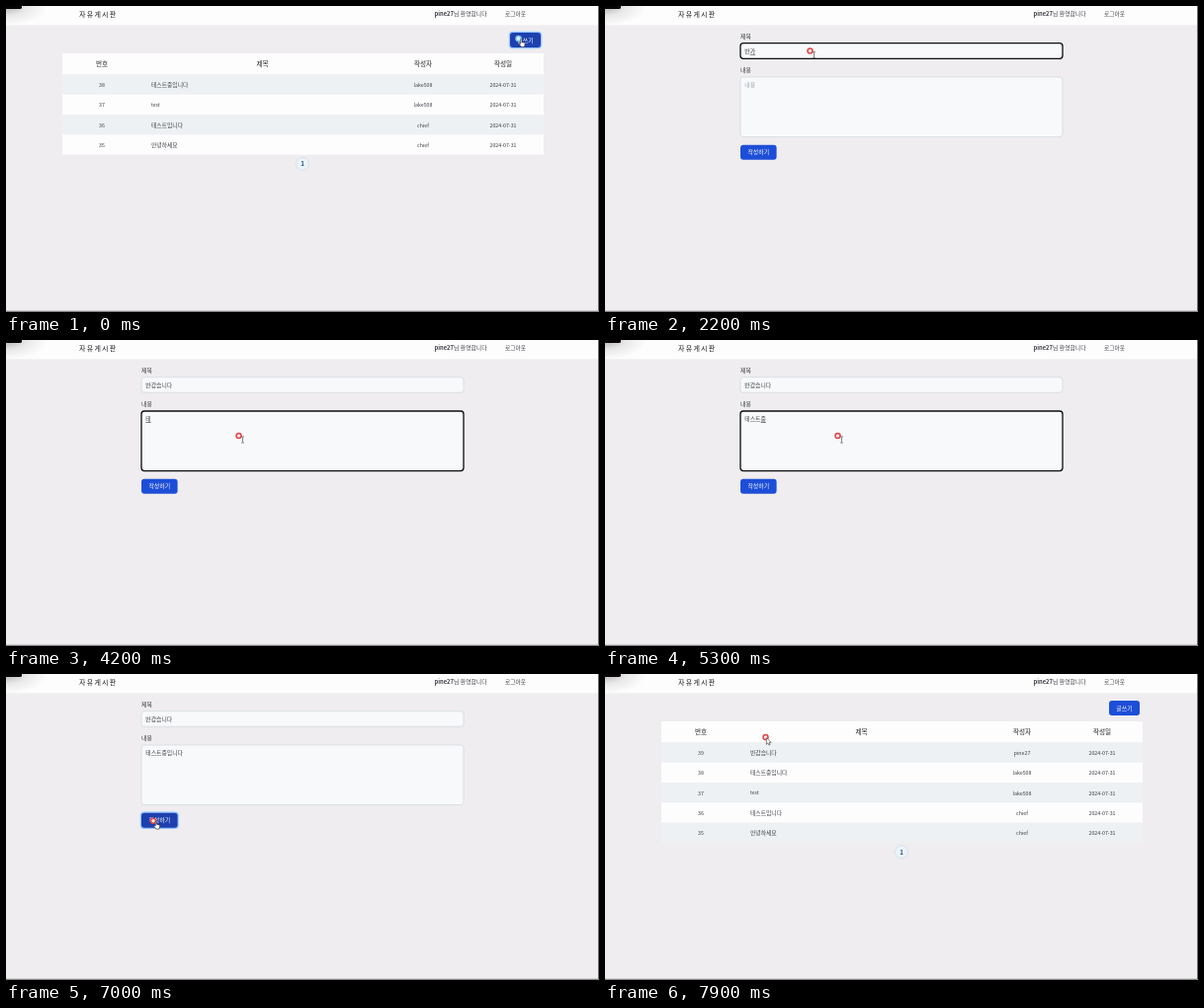
An HTML page that plays this animation: 600x310 px, repeating every 8000 ms.

```html
<!DOCTYPE html>
<html lang="ko">
<head>
<meta charset="utf-8">
<style>
  html, body { margin: 0; height: 100%; overflow: hidden; background: #efedef; }
  svg { display: block; width: 100vw; height: 100vh; }
  text { font-family: "Noto Sans CJK KR", "Noto Sans CJK", "Noto Sans", sans-serif; white-space: pre; }
</style>
</head>
<body>
<svg id="stage" viewBox="0 0 600 310">
  <defs>
    <radialGradient id="shade" cx="0" cy="0" r="1">
      <stop offset="0" stop-color="#000" stop-opacity=".3"/>
      <stop offset=".5" stop-color="#000" stop-opacity=".08"/>
      <stop offset="1" stop-color="#000" stop-opacity="0"/>
    </radialGradient>
  </defs>
  <rect width="600" height="310" fill="#efedef"/>
  <rect width="600" height="19.3" fill="#fdfdfe"/>
  <g id="header"></g>
  <g id="page"></g>
  <rect width="42" height="20" fill="url(#shade)"/>
  <path d="M0 0H16V1.5Q16 3 14 3H0Z" fill="#080408"/>
  <path d="M599.5 0V309.3H0" fill="none" stroke="#626064" stroke-width=".9"/>
  <g id="pointer"></g>
</svg>
<script>
const LOOP = 8000;
const FORM_OPENS = 300, TITLE_FOCUS = 600, BODY_FOCUS = 3400, SUBMIT = 6900, LIST_OPENS = 7200;
const GLYPH = 5.4, DARK = '#3c3e44';

// [time, x, y] of the input-mode ring that travels with the mouse
const PATH = [
  [0, 518.5, 33], [200, 518.5, 33], [600, 207.5, 45.5], [3100, 207.5, 45.5],
  [3400, 235.5, 97], [6150, 235.5, 97], [6400, 125, 138], [6650, 135, 158],
  [6850, 149, 148], [7100, 149, 149], [7250, 154, 157], [7600, 165.5, 128], [7900, 162.5, 64]
];
// [time, text] while syllables are being composed
const TITLE = [
  [1800, 'ㅂ'], [1900, '바'], [2000, '반'], [2100, '반ㄱ'], [2200, '반가'], [2400, '반갑'],
  [2500, '반갑스'], [2600, '반갑습'], [2700, '반갑습니'], [2800, '반갑습니다']
];
const BODY = [
  [4000, 'ㅌ'], [4100, '테'], [4300, '텟'], [4800, '테스'], [5000, '테스트'], [5200, '테스트주'],
  [5300, '테스트중'], [5500, '테스트중이'], [5600, '테스트중입'], [5800, '테스트중입니'], [6000, '테스트중입니다']
];
const POSTS = [
  [39, '반갑습니다', 'pine27'], [38, '테스트중입니다', 'lake508'], [37, 'test', 'lake508'],
  [36, '테스트입니다', 'chief'], [35, '안녕하세요', 'chief']
];

const $ = id => document.getElementById(id);

function text(value, x, y, { size = 5.85, fill = DARK, weight = 400, anchor = 'start', spacing = 0 } = {}) {
  return `<text x="${x}" y="${y + size * .37}" font-size="${size}" fill="${fill}" font-weight="${weight}"
    text-anchor="${anchor}" letter-spacing="${spacing}">${value}</text>`;
}
function box(x, y, w, h, fill, extra = '') {
  return `<rect x="${x}" y="${y}" width="${w}" height="${h}" fill="${fill}" ${extra}/>`;
}
const cell = (value, x, y) => text(value, x, y, { size: 5.25, anchor: 'middle' });

function button(label, x, y, w, active) {
  const ring = active ? box(x - 1.2, y - 1.2, w + 2.4, 17.4, '#93c5fd', 'rx="4"') : '';
  return ring + box(x, y, w, 15, active ? '#1e40af' : '#1d4ed8', 'rx="3"') +
    text(label, x + w / 2, y + 7.5, { size: 5.9, fill: '#fff', weight: 500, anchor: 'middle' });
}

function listPage(posts, pressed, hovered) {
  const rowHeight = 20.35;
  let out = button('글쓰기', 510, 27, 31, pressed) + box(57, 48, 487, 21.3, '#fdfdfe');
  [['번호', 97], ['제목', 259.5], ['작성자', 422], ['작성일', 503]].forEach(([label, x]) =>
    out += text(label, x, 58.7, { size: 6.6, weight: 500, fill: '#222', anchor: 'middle' }));
  posts.forEach(([id, title, author], i) => {
    const top = 69.3 + i * rowHeight, y = top + 10.6;
    const fill = id === hovered ? '#dee0e1' : i % 2 ? '#fdfdfe' : '#eef1f3';
    out += box(57, top, 487, rowHeight, fill) + cell(id, 97, y) +
      text(title, 147, y, { size: title === 'test' ? 5 : 5.8 }) +
      cell(author, 422, y) + cell('2024-07-31', 503, y);
  });
  const y = 78.5 + posts.length * rowHeight;
  return out + `<circle cx="300" cy="${y}" r="6.5" fill="#ecf3f9" stroke="#cddfee" stroke-width=".8"/>` +
    text('1', 300, y, { size: 6.2, weight: 700, fill: '#234a82', anchor: 'middle' });
}

function latest(steps, t) {
  return steps.reduce((value, [at, next]) => t >= at ? next : value, '');
}

function field(label, value, y, h, focusedFor) {
  const focused = focusedFor >= 0, x = 141.3, lineY = y + 8;
  const border = focused ? 'stroke="#0c0d10" stroke-width="1.3"' : 'stroke="#d3dae1" stroke-width=".8"';
  const end = x + value.length * GLYPH;
  let out = text(label, 137, y - 7.2, { fill: '#33363c' }) +
    box(137, y, 326, h, '#f7f9fb', `rx="3" ${border}`) +
    text(value || label, x, lineY, { fill: value ? DARK : '#a0a5ae' });
  if (focused && value) out += box(end - GLYPH, lineY + 3.2, GLYPH, .6, '#333');
  if (focused && focusedFor % 1060 < 530) out += box(end - .2, lineY - 3.7, .6, 7.2, '#222');
  return out;
}

function formPage(t) {
  const titleFocus = t < BODY_FOCUS ? t - TITLE_FOCUS : -1;
  const bodyFocus = t < SUBMIT ? t - BODY_FOCUS : -1;
  return field('제목', latest(TITLE, t), 37.7, 15.6, titleFocus) +
    field('내용', latest(BODY, t), 72, 60.6, bodyFocus) +
    button('작성하기', 137, 140.8, 36.6, t >= SUBMIT);
}

function position(t) {
  const i = PATH.findIndex(([at]) => at > t);
  if (i < 0) return PATH[PATH.length - 1].slice(1);
  const [t0, x0, y0] = PATH[i - 1], [t1, x1, y1] = PATH[i];
  const k = (t - t0) / (t1 - t0), ease = k * k * (3 - 2 * k);
  return [x0 + (x1 - x0) * ease, y0 + (y1 - y0) * ease];
}

const CURSORS = {
  arrow: '<path d="M.8 .5V7.3L2.4 5.9L3.4 8L4.6 7.5L3.6 5.4H5.6Z" fill="#fff" stroke="#333" stroke-width=".6"/>',
  hand: '<path d="M2.3 .8Q3.2 .2 3.5 1.2V3.7L6 4.3Q6.8 4.6 6.6 5.6L6 8.4H2.8L.8 5.7Q.9 4.7 2.3 5.2Z" fill="#fff" stroke="#333" stroke-width=".65"/>',
  beam: '<path d="M2.6 .8H3.6L4 1.2L4.4 .8H5.4M4 1.2V6.8M2.6 7.2H3.6L4 6.8L4.4 7.2H5.4" fill="none" stroke="#444" stroke-width=".65"/>'
};

function cursorKind(t, x, y) {
  if (t < FORM_OPENS) return t < 250 ? 'hand' : 'arrow';
  if (t >= LIST_OPENS) return y > 66 ? 'hand' : 'arrow';
  const inside = (left, right, top, bottom) => x > left && x < right && y > top && y < bottom;
  if (inside(133, 460, 34, 50) || inside(133, 460, 69, 129)) return 'beam';
  return inside(133, 171, 138, 153) ? 'hand' : 'arrow';
}

function pointer(t) {
  const [x, y] = position(t);
  const korean = t >= 1900 && t < BODY_FOCUS || t >= 4000;
  return `<g transform="translate(${x.toFixed(2)} ${y.toFixed(2)})">
    <circle r="2.5" fill="${korean ? '#fbe9e9' : '#e3f3fc'}" stroke="${korean ? '#dc4646' : '#7fc8ef'}" stroke-width="1.5"/>
    ${CURSORS[cursorKind(t, x, y)]}</g>`;
}

function page(t) {
  if (t < FORM_OPENS) return listPage(POSTS.slice(1), true);
  if (t < LIST_OPENS) return formPage(t);
  return listPage(POSTS, false, t < 7680 ? 35 : 0);
}

$('header').innerHTML =
  text('자유게시판', 74, 8, { size: 7, weight: 500, fill: '#1c1c20', spacing: 1.25 }) +
  text('<tspan font-weight="600">pine27</tspan>님 환영합니다', 486.5, 8, { size: 5.8, anchor: 'end' }) +
  text('로그아웃', 505, 8, { size: 5.7 });

let shown = '';
function draw(now) {
  const t = now % LOOP, content = page(t);
  if (content !== shown) $('page').innerHTML = shown = content;
  $('pointer').innerHTML = pointer(t);
  requestAnimationFrame(draw);
}
draw(0);
</script>
</body>
</html>
```
